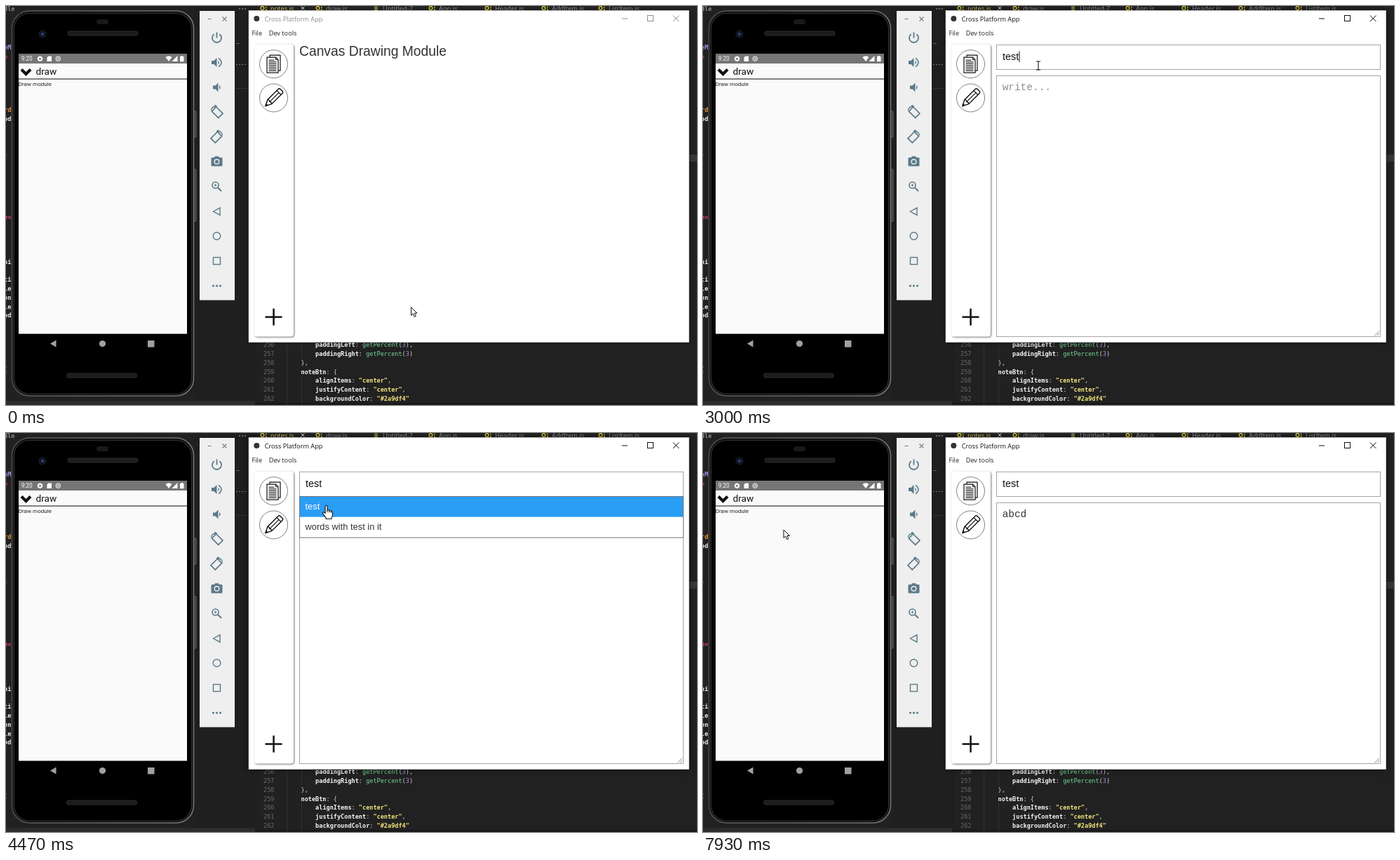
Write an HTML page with a canvas that moves like this. It is 985x569 px and loops after 8000 ms.

```html
<!DOCTYPE html>
<html lang="en">
<head>
<meta charset="utf-8">
<title>Cross Platform App</title>
<style>
html, body { margin: 0; width: 100%; height: 100%; overflow: hidden; background: #1f1f1f; }
canvas { display: block; width: 100%; height: 100%; }
</style>
</head>
<body>
<canvas id="stage" width="985" height="569"></canvas>
<script>
const c = document.getElementById('stage').getContext('2d');
const LOOP = 8000, STEP = 200 / 3;
const ARIAL = '"Liberation Sans", Arial, sans-serif';
const UI = '"Open Sans", "Noto Sans", sans-serif';
const MONO = '"DejaVu Sans Mono", monospace';
const COURIER = '"Liberation Mono", "Courier New", monospace';
const ROBOTO = 'Roboto, sans-serif';
const SLATE = '#5b7a89';

// ---------- drawing helpers ----------
function rect(x, y, w, h, fill) {
  c.fillStyle = fill;
  c.fillRect(x, y, w, h);
}
function frame(x, y, w, h, color, width = 1) {
  c.strokeStyle = color;
  c.lineWidth = width;
  c.strokeRect(x, y, w, h);
}
function round(x, y, w, h, r, fill, stroke, width = 1) {
  c.beginPath();
  c.roundRect(x, y, w, h, r);
  paint(fill, stroke, width);
}
function disc(x, y, r, fill, stroke, width = 1) {
  c.beginPath();
  c.arc(x, y, r, 0, Math.PI * 2);
  paint(fill, stroke, width);
}
function paint(fill, stroke, width, path) {
  if (fill) { c.fillStyle = fill; path ? c.fill(path) : c.fill(); }
  if (stroke) {
    c.strokeStyle = stroke;
    c.lineWidth = width;
    path ? c.stroke(path) : c.stroke();
  }
}
function shape(d, fill, stroke, width = 1) {
  paint(fill, stroke, width, new Path2D(d));
}
function text(s, x, y, font, color) {
  c.font = font;
  c.fillStyle = color;
  c.fillText(s, x, y);
}
function at(x, y, angle, draw) {
  c.save();
  c.translate(x, y);
  c.rotate(angle);
  draw();
  c.restore();
}

// ---------- code editor behind everything ----------
const CODE = [
  [4, ['paddingLeft', 'w'], [': ', 'g'], ['getPercent', 'f'], ['(', 'g'], ['3', 'n'], ['),', 'g']],
  [4, ['paddingRight', 'w'], [': ', 'g'], ['getPercent', 'f'], ['(', 'g'], ['3', 'n'], [')', 'g']],
  [0, ['},', 'g']],
  [0, ['noteBtn', 'w'], [': {', 'g']],
  [4, ['alignItems', 'w'], [': ', 'g'], ['"center"', 's'], [',', 'g']],
  [4, ['justifyContent', 'w'], [': ', 'g'], ['"center"', 's'], [',', 'g']],
  [4, ['backgroundColor', 'w'], [': ', 'g'], ['"#2a9df4"', 's']]
];
const INK = { w: '#f4f4f4', g: '#d0d0d0', f: '#74d69a', n: '#a58be0', s: '#f0e67c' };
const TABS = [['notes.js', 377], ['draw.js', 456], ['Untitled-2', 537], ['App.js', 617],
  ['Header.js', 697], ['AddItem.js', 778], ['ListItem.js', 859]];
const MARGIN = [['dle', 7, '#8a8a8a'], ['eM', 62, '#a58be0'], ['=', 75, '#e0405f'], ['rd', 151, '#e8963c'],
  ['od', 164, '#eee'], ['-', 215, '#e0405f'], ['e=', 304, '#e0405f'], ['ni', 368, '#eee'], ['ti', 393, '#eee'],
  ['le', 406, '#eee'], ['en', 419, '#eee'], ['le', 432, '#eee'], ['od', 444, '#eee'], ['(', 521, '#999']];

function editor() {
  rect(0, 0, 985, 569, '#212121');
  rect(268, 0, 90, 569, '#1f1f1f');
  rect(358, 0, 627, 8, '#242424');
  rect(974, 212, 11, 10, '#363636');
  rect(0, 563, 355, 6, '#2d2d2d');
  rect(355, 566, 630, 3, '#191919');
  for (const [s, y, color] of MARGIN) text(s, -3, y, 'bold 8.55px ' + MONO, color);
  for (const x of [333, 337, 341]) disc(x, 4, 0.8, '#ccc');
  for (let x = 328; x < 344; x += 4) rect(x, 83, 2, 1, '#777');
  rect(328, 53, 5, 1, '#6b662f');
  rect(328, 117, 16, 1, '#333');

  TABS.forEach(([name, x], i) => {
    if (i === 2) for (const y of [1, 3, 5]) rect(x - 12, y, 5, 1, '#c9bf55');
    else {
      disc(x - 11.5, 3, 2.4, null, '#e0cc35', 1.3);
      rect(x - 7, 1, 1.5, 1.5, '#e0cc35');
      rect(x - 7, 4, 1.5, 2, '#e0cc35');
    }
    text(name, x, 7, '9.3px ' + UI, i ? '#969696' : '#d9cf60');
  });
  shape('M420.5 .5l5 5m0-5l-5 5', null, '#ddd');

  rect(400, 480, 1, 89, '#303030');
  rect(421, 480, 1, 23, '#303030');
  rect(421, 528, 1, 41, '#303030');
  CODE.forEach(([indent, ...parts], i) => {
    const y = 486.4 + i * 12.7;
    text(256 + i, 367, y, '8.55px ' + MONO, '#686868');
    let x = 420.5 + indent * 5.15;
    for (const [s, kind] of parts) {
      const weight = kind === 'w' || kind === 's' ? 'bold ' : '';
      text(s, x, y, weight + '8.55px ' + MONO, INK[kind]);
      x += c.measureText(s).width;
    }
  });
}

// ---------- phone ----------
function phone() {
  round(266, 150, 5, 37, 1, '#3c3c3c', '#777', 0.8);
  round(266, 233, 5, 74, 1, '#3c3c3c', '#777', 0.8);
  const rim = c.createLinearGradient(8, 0, 268, 0);
  rim.addColorStop(0, '#4a4a4a');
  rim.addColorStop(0.1, '#5c5c5c');
  rim.addColorStop(1, '#757575');
  round(8.5, 7, 259, 549, 25, '#101010', rim, 1.6);
  round(11.5, 10.5, 253, 542.5, 22, '#000', '#303030', 1.2);
  round(129, 19, 17, 7, 3.5, '#191919');
  round(88, 36, 100, 6, 2.5, '#1c1c1c', '#2c2c2c');
  round(86.5, 524, 100, 6, 2.5, '#1c1c1c', '#2c2c2c');
  disc(52, 40, 5, '#10131f', '#1c2130');
  disc(52, 40, 2.2, '#2d3e78');

  rect(18, 68, 240, 399.5, '#fafafa');
  rect(18, 68, 240, 14, '#757575');
  text('9:20', 21.7, 78.3, '8.3px ' + ROBOTO, '#fff');
  disc(48.5, 75.2, 2.4, null, '#fff', 1.7);
  for (let i = 0; i < 8; i++) at(48.5, 75.2, i * Math.PI / 4, () => rect(-0.7, -4, 1.4, 1.5, '#fff'));
  shape('M60.5 71.5h4.5v7.5h-6.5v-5.5z', '#fff');
  disc(74.3, 75.2, 3.3, null, '#fff', 1);
  disc(74.3, 75.2, 1.4, null, '#fff', 0.9);
  shape('M227.5 73Q232 69.5 236.5 73L232 79z', '#fff');
  shape('M244.5 71v8h-8z', '#fff');
  shape('M248 72h1.5v-1h2.5v1h1.5v7.3h-5.5z', '#fff');

  shape('M20.5 92l3-3 5 5 5-5 3 3-8 8z', '#111');
  text('draw', 42.5, 98.4, '13.7px ' + ROBOTO, '#111');
  rect(18, 103.5, 240, 1.1, '#222');
  text('Draw module', 17.7, 113.7, '8.1px ' + ROBOTO, '#222');

  shape('M63 481.5l8.5-5v10z', '#a0a0a0');
  disc(137.5, 481.5, 4.6, '#a0a0a0');
  rect(202, 477, 9.5, 9.5, '#a0a0a0');
}

// ---------- emulator tool strip ----------
function speaker(x, y) {
  shape(`M${x} ${y - 2.5}h3.5l4-4v13l-4-4h-3.5z`, SLATE);
}
function rotateIcon(y, flip) {
  c.save();
  c.translate(300.5, y);
  c.scale(flip, 1);
  at(0.7, 0.7, -Math.PI / 4, () => frame(-4.4, -6.6, 8.8, 13.2, SLATE, 1.7));
  shape('M-8 -2Q-7.5 -7 -2 -8', null, SLATE, 1.4);
  shape('M-3 -10.5l4 2.5-4 2.5z', SLATE);
  c.restore();
}
function tools() {
  rect(276, 7, 50, 412.5, '#efefef');
  rect(287.5, 18, 5, 1, '#777');
  shape('M308.5 15.5l6 6m0-6l-6 6', null, '#70808a', 1.1);
  c.beginPath();
  c.arc(300.5, 45.5, 6.5, -0.95, Math.PI + 0.95);
  paint(null, SLATE, 1.8);
  rect(299.6, 37.5, 1.8, 8, SLATE);
  speaker(293, 80.5);
  shape('M302.5 77.5q3 3 0 6z', SLATE);
  shape('M303 74.3q8 6.2 0 12.4', null, SLATE, 1.6);
  speaker(295, 116);
  shape('M304 113q3.5 3 0 6z', SLATE);
  rotateIcon(151, 1);
  rotateIcon(186.5, -1);
  round(292.5, 216, 16, 12.5, 1.5, SLATE);
  rect(297.5, 214.3, 6, 3, SLATE);
  disc(300.5, 222, 3.3, null, '#efefef', 1.4);
  disc(298.5, 255.5, 4.5, null, SLATE, 1.6);
  shape('M302 259l5 5', null, SLATE, 2);
  shape('M296.5 255.5h4m-2-2v4', null, SLATE, 1);
  shape('M295.5 293l9.5-5.2v10.4z', null, SLATE, 1.4);
  disc(300.5, 328, 5.3, null, SLATE, 1.4);
  frame(295.5, 358.5, 10, 10, SLATE, 1.4);
  for (const x of [295.5, 300.5, 305.5]) disc(x, 399, 1.6, SLATE);
}

// ---------- desktop app window ----------
function docIcon() {
  shape('M-5.5 -10V-12.5H9.5V9.5H6', null, '#111', 1.2);
  shape('M-9.5 -9.5H3L6.5 -6V12.5H-9.5z', '#fff', '#111', 1.2);
  shape('M3 -9.5V-6H6.5', null, '#111');
  for (let y = -6; y <= 9; y += 2.5) rect(-7, y, y < -4 ? 8 : 11, 1.2, '#222');
}
function pencilIcon() {
  c.rotate(Math.PI / 4);
  shape('M-4.2 -13.5q0-2 2-2h4.400q2 0 2 2V8L0 16.5L-4.200 8z', '#fff', '#111', 1.4);
  shape('M-4.2 -10.5h8.4M-4.2 8q2.1-2 4.2 0q2.1-2 4.2 0M0 -10.5V8', null, '#111', 1.2);
  shape('M-1.8 13h3.6L0 16.5z', '#111');
}
function button(y, icon, hover = 0) {
  c.save();
  c.shadowColor = `rgba(0,0,0,${0.4 * hover})`;
  c.shadowBlur = 2 * hover;
  c.shadowOffsetX = c.shadowOffsetY = hover;
  disc(381.5, y, 20 + hover * 0.5, '#fff', '#808080');
  c.restore();
  at(381.5, y, 0, icon);
}
function appWindow(s) {
  c.save();
  c.shadowColor = `rgba(0,0,0,${s.active ? 0.5 : 0.3})`;
  c.shadowBlur = s.active ? 8 : 4;
  rect(345.5, 6, 628.5, 474, '#777');
  c.restore();
  rect(346, 6.5, 627.5, 473, '#fff');

  const ink = s.active ? '#111' : '#8c8c8c';
  disc(357.3, 18, 4, '#333');
  text('Cross Platform App', 368.7, 21.8, '9.2px ' + UI, ink);
  rect(878, 17.5, 8, 1, ink);
  frame(914.5, 13.5, 8, 8, ink);
  shape('M951 13.5l8.5 8.5m0-8.5l-8.5 8.5', null, ink);
  text('File', 350.5, 41.8, '9.2px ' + UI, '#222');
  text('Dev tools', 374.7, 41.8, '9.2px ' + UI, '#222');

  c.save();
  c.shadowColor = 'rgba(0,0,0,.55)';
  c.shadowBlur = 2.5;
  c.shadowOffsetX = c.shadowOffsetY = 1;
  round(354, 54.5, 56, 417, 4, '#fff');
  c.restore();
  button(82.7, docIcon, s.hover);
  button(131, pencilIcon);
  rect(369.5, 442.3, 24, 2.5, '#111');
  rect(380.3, 431.5, 2.5, 24, '#111');

  if (s.note) notePage(s);
  else text('Canvas Drawing Module', 418, 70.7, '19.3px ' + ARIAL, '#333');
}

const LIST = ['test', 'words with test in it', 'shopping list', 'things to do', 'ideas', 'meeting', 'new note'];

function notePage(s) {
  frame(418.5, 55.5, 547, 35, '#a5a5a5');
  frame(418.5, 99.5, 547, 372, '#a5a5a5');
  shape('M957.5 470l6.5-6.5m-3 6.5l3-3', null, '#777', 0.9);
  text(s.title, 427, 77.2, '14.4px ' + ARIAL, '#111');
  if (s.caret) rect(427.3 + c.measureText(s.title).width, 64.5, 1, 15.5, '#111');

  const body = s.body || 'write...';
  text(body, 426.7, 120.3, '14.4px ' + COURIER, s.body ? '#333' : '#8f8f8f');
  if (s.bodyCaret) rect(427 + c.measureText(s.body).width, 108, 1, 16, '#111');

  if (!s.rows) return;
  rect(418, 91, 548, s.rows * 29.1, '#fff');
  rect(418, 91, 548, 28.7, '#2a9df4');
  for (let i = 0; i < s.rows; i++)
    text(LIST[i], 426.5, 109.3 + i * 29, '12.9px ' + ARIAL, i ? '#333' : '#fff');
  frame(418.5, 90.5, 547, s.rows * 29.1 + 0.5, '#777');
}

// ---------- pointer ----------
const ARROW = 'M.5 .5V12.2L3.2 9.7L5.2 14.3L7.3 13.4L5.3 9H9z';
const HAND = 'M-1.4 1.2Q-1.4 -.3 .1 -.3Q1.5 -.3 1.5 1.2V6.6Q3.8 5.6 4.3 7.4Q6.5 6.5 7 8.3Q9 7.8 9 9.7V13.5Q9 15.5 7.5 17.3V19H-.5V17.3L-4.8 11.6Q-5.5 9.8 -3.8 9.3L-1.4 11z';
const BEAM = 'M-3 -6H-.8L0 -5.3L.8 -6H3M0 -5.3V5.3M-3 6H-.8L0 5.3L.8 6H3';

function pointer(x, y, kind) {
  at(x, y, 0, () => {
    if (kind === 'beam') shape(BEAM, null, '#111', 1.1);
    else if (kind === 'arrow') shape(ARROW, '#fff', '#111', 1);
    else {
      shape(HAND, '#fff', '#111', 1.1);
      shape('M1.5 6.6V9.5M4.3 7.4V10M7 8.3V10.5', null, '#111', 1);
    }
  });
}

// time, x, y
const PATH = [
  [0, 577, 429], [130, 470, 330], [200, 328, 220], [330, 346, 128],
  [530, 346, 128], [800, 384, 92], [1065, 390, 83.5], [1330, 390, 84],
  [1600, 504, 76], [1670, 512, 76], [1800, 499, 81],
  [2800, 499, 81], [3000, 478, 85], [3330, 477, 86], [3600, 475, 104], [3865, 476, 116.5],
  [4200, 462, 108], [4465, 456.5, 103.5], [4800, 456.5, 103.5], [5200, 456.5, 123],
  [5800, 456.5, 123], [6200, 526, 147], [7530, 526, 147],
  [7670, 420, 90], [7800, 240, 64], [7930, 114.5, 137.5], [LOOP, 114.5, 137.5]
];
// each kind holds from its time on
const KINDS = [[0, 'arrow'], [800, 'hand'], [1400, 'arrow'], [1530, 'beam'], [3470, 'hand'],
  [4930, 'beam'], [7600, 'arrow']];

function along(t) {
  let i = 1;
  while (i < PATH.length - 1 && PATH[i][0] <= t) i++;
  const [t0, x0, y0] = PATH[i - 1], [t1, x1, y1] = PATH[i];
  const k = Math.min(1, (t - t0) / (t1 - t0));
  const e = k * k * (3 - 2 * k);
  return [x0 + (x1 - x0) * e, y0 + (y1 - y0) * e];
}
const clamp = v => Math.max(0, Math.min(1, v));
const typed = (word, times, t) => word.slice(0, times.filter(k => t >= k).length);

function state(t) {
  return {
    active: t >= 990,
    note: t >= 1190,
    hover: clamp((t - 800) / 200) * clamp((1600 - t) / 200),
    title: typed('test', [2390, 2460, 2590, 2660], t),
    caret: t >= 2325 && t < 4400,
    rows: t < 3390 || t >= 4925 ? 0 : t < 3790 ? 7 : 2,
    body: typed('abcd', [6525, 6725, 6925, 7060], t),
    bodyCaret: t >= 5595 && t < 7590
  };
}

function draw(now) {
  const t = Math.floor((now % LOOP + 4) / STEP) * STEP;
  editor();
  phone();
  tools();
  appWindow(state(t));
  const kind = KINDS.filter(k => t >= k[0] - 5).pop()[1];
  // the pointer hides while typing
  if (t < 6525 || t >= 7590) pointer(...along(t), kind);
}

const start = performance.now();
function tick() {
  draw(performance.now() - start);
  requestAnimationFrame(tick);
}
tick();
</script>
</body>
</html>
```
